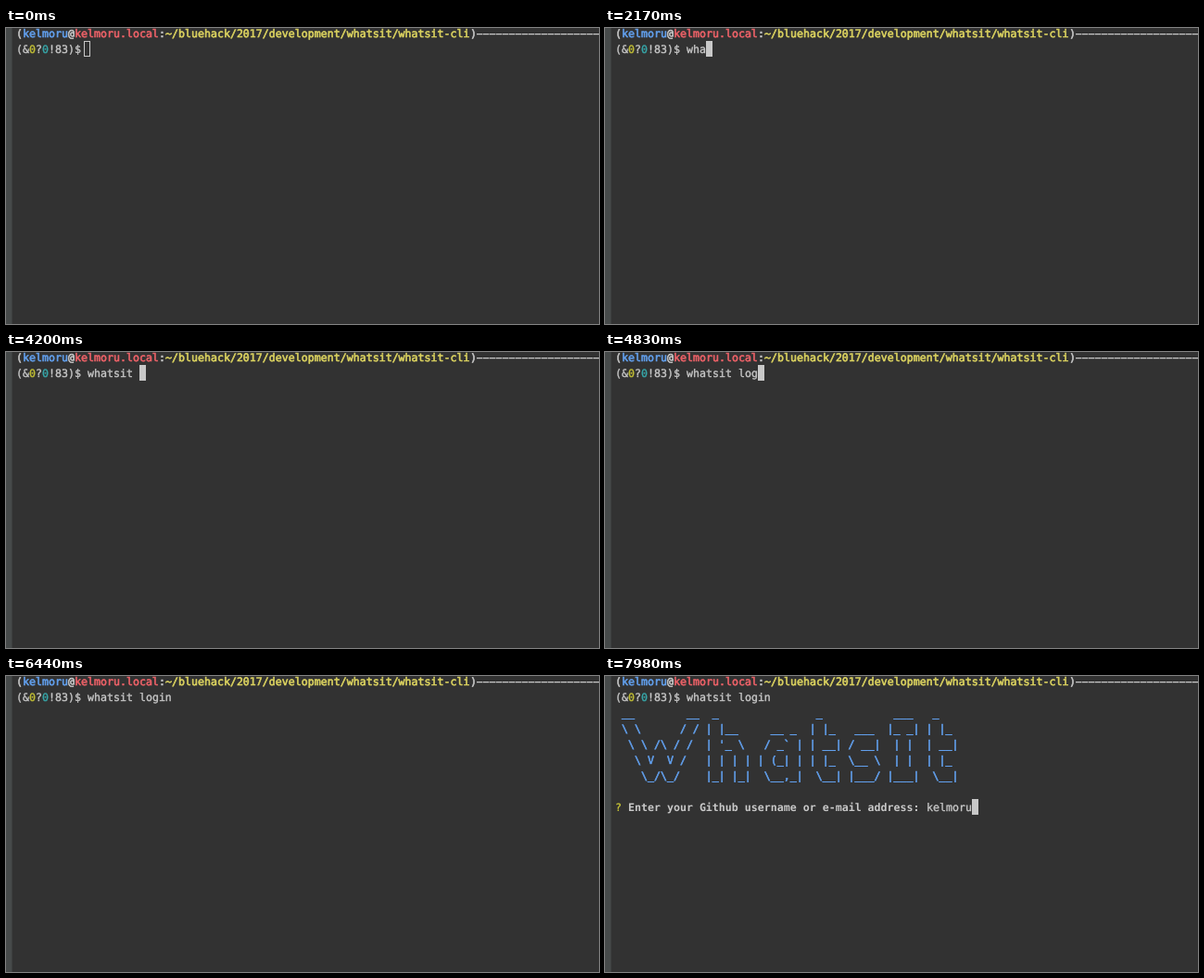
Animation, 640 px wide and 320 px high, one loop 8000 ms. Source, as an HTML page:

```html
<!DOCTYPE html>
<html lang="en">
<head>
<meta charset="utf-8">
<title>Terminal login</title>
<style>
  html, body { margin: 0; width: 100%; height: 100%; overflow: hidden; background: #323232; }
  svg { display: block; width: 640px; height: 320px; }
  text {
    font: 11.627px "DejaVu Sans Mono", monospace;
    white-space: pre;
    text-rendering: geometricPrecision;
    stroke-width: .35px;
  }
  .heavy { stroke-width: .6px; }
  .bold { font-weight: bold; stroke-width: 0; }
</style>
</head>
<body>
<svg id="stage" viewBox="0 0 640 320">
  <rect width="640" height="320" fill="#323232"/>
  <rect width="6.5" height="320" fill="#464a4a"/>
</svg>
<script>
const LOOP = 8000, LEFT = 11, CELL = 7, ROW = 17;
const WHITE = '#c8c8c8', BLUE = '#62a0ee', RED = '#ee6268', YELLOW = '#ded560',
      OLIVE = '#c0bd35', CYAN = '#37a6a8';
const USER = 'kelmoru';
const stage = document.getElementById('stage');

function add(tag, attrs, parent = stage) {
  const el = document.createElementNS('http://www.w3.org/2000/svg', tag);
  for (const k in attrs) el.setAttribute(k, attrs[k]);
  parent.append(el);
  return el;
}
const cellX = col => LEFT + col * CELL;
const rowTop = row => row * ROW - 3;

function write(col, row, str, color, parent, cls = '') {
  const el = add('text', {
    x: cellX(col), y: row * ROW + 10, fill: color, stroke: color, class: cls
  }, parent);
  el.textContent = str;
  return el;
}
function writeRuns(row, runs, cls) {
  let col = 0;
  for (const [str, color] of runs) {
    write(col, row, str, color, stage, cls);
    col += str.length;
  }
  return col;
}

// Prompt
const end = writeRuns(0, [
  ['(', WHITE], [USER, BLUE], ['@', WHITE], [USER + '.local', RED], [':', WHITE],
  ['~/bluehack/2017/development/whatsit/whatsit-cli', YELLOW], [')', WHITE]
], 'heavy');
add('path', {
  d: `M${cellX(end)} 6.6H640`, stroke: WHITE, 'stroke-width': 1.2, 'stroke-dasharray': '6.5 .5'
});
writeRuns(1, [['(&', WHITE], ['0', OLIVE], ['?', WHITE], ['0', CYAN], ['!83)$', WHITE]]);

// Banner letters, placed side by side
const T = ['  _   ', ' | |_ ', ' | __|', ' | |_ ', '  \\__|'];
const letters = [
  [' __        __', ' \\ \\      / /', '  \\ \\ /\\ / / ', '   \\ V  V /  ', '    \\_/\\_/   '],
  ['  _     ', ' | |__  ', " | '_ \\ ", ' | | | |', ' |_| |_|'],
  ['        ', '   __ _ ', '  / _` |', ' | (_| |', '  \\__,_|'],
  T,
  ['      ', '  ___ ', ' / __|', ' \\__ \\', ' |___/'],
  ['  ___ ', ' |_ _|', '  | | ', '  | | ', ' |___|'],
  T
];
const banner = add('g', {});
for (let i = 0; i < 5; i++) {
  write(0, 2 + i, letters.map(l => l[i]).join(''), BLUE, banner, 'heavy');
}

const QUESTION = 'Enter your Github username or e-mail address: ';
const ask = add('g', {});
write(0, 8, '?', OLIVE, ask, 'bold');
write(2, 8, QUESTION, WHITE, ask, 'bold');

const command = write(11, 1, '', WHITE);
const answer = write(2 + QUESTION.length, 8, '', WHITE);
const block = add('rect', { width: CELL, height: ROW, fill: WHITE });
const hollow = add('rect', {
  x: 84.5, y: 14.5, width: 6, height: 16, fill: 'none', stroke: WHITE, 'stroke-width': 1
});

// Timeline in ms
const FOCUS = 1050, ENTER = 5810, BANNER = 6580, ASK = 6650;
const commandKeys = [1680, 1890, 2100, 2310, 2660, 2940, 3010, 3080, 4340, 4550, 4760, 5180, 5320];
const answerKeys = [7350, 7420, 7560, 7630, 7770, 7840, 7910];
const blinkOff = [[1330, 1610], [3500, 3990], [5040, 5180], [5390, 5880], [6370, 6860]];

const typed = (str, keys, t) => str.slice(0, keys.filter(k => k <= t).length);
const show = (el, on) => el.setAttribute('visibility', on ? 'visible' : 'hidden');

function draw(t) {
  const cmd = typed('whatsit login', commandKeys, t);
  const ans = typed(USER, answerKeys, t);
  command.textContent = cmd;
  answer.textContent = ans;
  show(banner, t >= BANNER);
  show(ask, t >= ASK);
  show(hollow, t < FOCUS);

  let col = 11 + cmd.length, row = 1;
  if (t >= ASK) { col = 2 + QUESTION.length + ans.length; row = 8; }
  else if (t >= ENTER) { col = 0; row = 2; }
  block.setAttribute('x', cellX(col));
  block.setAttribute('y', rowTop(row));
  show(block, t >= FOCUS && !blinkOff.some(([a, b]) => t >= a && t < b));
}

const start = performance.now();
function tick() {
  draw((performance.now() - start) % LOOP);
  requestAnimationFrame(tick);
}
tick();
</script>
</body>
</html>
```
